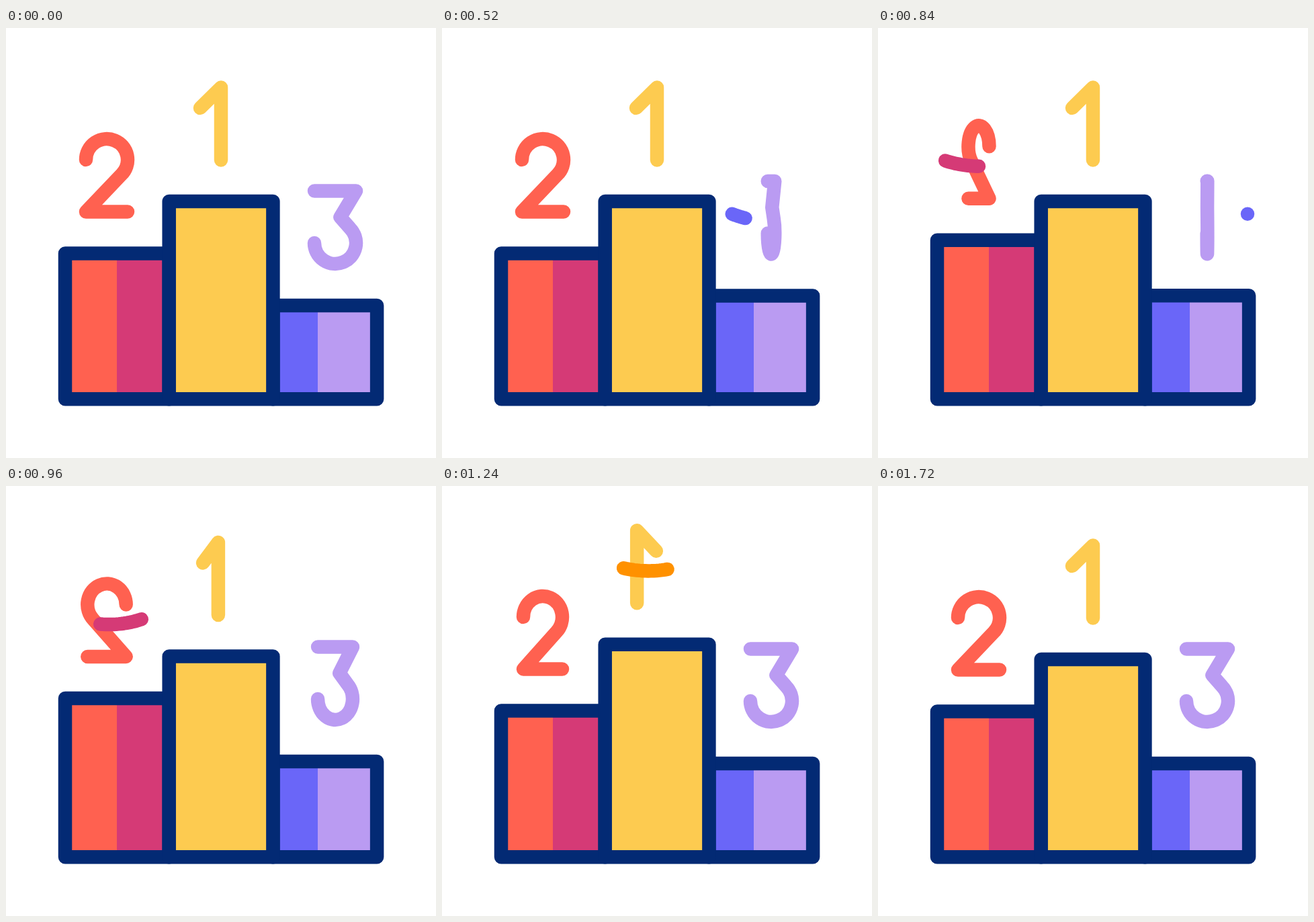
Animation of 640 by 640 pixels, one loop 2000 ms. Source, as an HTML page:

```html
<!DOCTYPE html>
<html lang="en">
<head>
<meta charset="utf-8">
<title>Podium</title>
<style>
html, body { margin: 0; width: 100%; height: 100%; overflow: hidden; background: #fff; }
svg { display: block; width: 100vw; height: 100vh; }
</style>
</head>
<body>
<svg id="stage" viewBox="0 0 640 640" stroke-width="20.5" stroke-linecap="round" stroke-linejoin="round"></svg>
<script>
const LOOP = 2000, STEP = 40, BASE = 552.2, NAVY = '#032a74';
const stage = document.getElementById('stage');

// Digit outlines around their own centre; s squeezes x and may be negative.
const arc = (s, x, y) => `A${31 * Math.abs(s)} 31 0 1 ${s > 0 ? 1 : 0} ${x * s} ${y}`;
const digits = {
  1: s => `M${-15.5 * s} -23.5L${15.5 * s} -54L${15.5 * s} 54`,
  2: s => `M${-31 * s} -23.5${arc(s, 22, -1.6)}L${-31 * s} 54H${31 * s}`,
  3: s => `M${-31 * s} -54H${31 * s}L${7.5 * s} -15L${22 * s} 1.6${arc(s, -31, 23.5)}`
};

// Turn and lift over time, in ms after the spin begins.
const turn = [[0, 1], [60, .98], [140, .735], [300, -.5], [382, -1.02],
  [540, 0], [580, .385], [622, .72], [760, 1]];
const lift = [[0, 0], [60, .02], [140, .195], [300, .965], [370, 1],
  [540, .63], [580, .4], [622, .21], [760, 0]];

const steps = [
  { n: 2, x: 88, w: 154.7, top: 335.6, cx: 150, cy: 219.5, start: 540, rise: 20.5,
    split: 165, fills: ['#ff6150', '#d53a76'], ink: '#ff6150', trail: '#d53a76', sweep: [660, 400] },
  { n: 3, x: 397.4, w: 154.7, top: 413, cx: 490, cy: 296.5, start: 300, rise: 23.3,
    split: 464, fills: ['#6a66f8', '#ba9bf2'], ink: '#ba9bf2', trail: '#6a66f8', sweep: [420, 400] },
  { n: 1, x: 242.7, w: 154.7, top: 258, cx: 304.5, cy: 142.5, start: 820, rise: 23.3,
    split: 320, fills: ['#fdcb50', '#fdcb50'], ink: '#fdcb50', trail: '#ff9100', sweep: [1040, 330] }
];

function add(tag, attrs) {
  const el = document.createElementNS('http://www.w3.org/2000/svg', tag);
  set(el, attrs);
  return stage.appendChild(el);
}

function set(el, attrs) {
  for (const k in attrs) el.setAttribute(k, attrs[k]);
}

const clamp = v => Math.max(0, Math.min(1, v));
const smooth = v => { v = clamp(v); return v * v * (3 - 2 * v); };

// Monotone cubic through the keys.
function curve(keys, t) {
  const last = keys.length - 1;
  if (t <= keys[0][0]) return keys[0][1];
  if (t >= keys[last][0]) return keys[last][1];
  const slope = i => (keys[i + 1][1] - keys[i][1]) / (keys[i + 1][0] - keys[i][0]);
  const tangent = i => {
    if (i === 0 || i === last) return 0;
    const a = slope(i - 1), b = slope(i);
    return a * b <= 0 ? 0 : 2 * a * b / (a + b);
  };
  let i = 0;
  while (t > keys[i + 1][0]) i++;
  const h = keys[i + 1][0] - keys[i][0], p = (t - keys[i][0]) / h, e = smooth(p);
  return keys[i][1] * (1 - e) + keys[i + 1][1] * e
    + h * p * (1 - p) * ((1 - p) * tangent(i) - p * tangent(i + 1));
}

const bezier = (a, b, c, d, p) => {
  const q = 1 - p;
  return q * q * q * a + 3 * q * q * p * b + 3 * q * p * p * c + p * p * p * d;
};

function trailPath(from, to) {
  const pts = [];
  for (let i = 0; i <= 16; i++) {
    const p = from + (to - from) * i / 16;
    pts.push(bezier(-60, -24, 24, 60, p).toFixed(2) + ' ' + bezier(-6, 9, 11, -5, p).toFixed(2));
  }
  return 'M' + pts.join('L');
}

for (const s of steps) {
  s.left = add('rect', { x: s.x, width: s.split - s.x, fill: s.fills[0] });
  s.right = add('rect', { x: s.split, width: s.x + s.w - s.split, fill: s.fills[1] });
  s.frame = add('rect', { x: s.x, width: s.w, fill: 'none', stroke: NAVY });
}
for (const s of steps) {
  s.digit = add('path', { fill: 'none', stroke: s.ink });
  s.streak = add('path', { fill: 'none', stroke: s.trail });
}

function draw(t) {
  for (const s of steps) {
    const dy = -s.rise * curve(lift, t - s.start);
    const y = s.top + dy;
    for (const r of [s.left, s.right, s.frame]) set(r, { y, height: BASE - y });

    let k = curve(turn, t - s.start);
    if (Math.abs(k) < .01) k = .01;
    const transform = `translate(${s.cx} ${s.cy + dy})`;
    set(s.digit, { d: digits[s.n](k), transform });

    const p = (t - s.sweep[0]) / s.sweep[1];
    const shown = p > 0 && p < 1.08;
    set(s.streak, {
      d: shown ? trailPath(Math.pow(clamp(p), 3), smooth(p / .9)) : '',
      transform,
      visibility: shown ? 'visible' : 'hidden'
    });
  }
}

const begin = performance.now();
function tick() {
  const t = (performance.now() - begin) % LOOP;
  draw(Math.floor(t / STEP) * STEP);
  requestAnimationFrame(tick);
}
tick();
</script>
</body>
</html>
```
